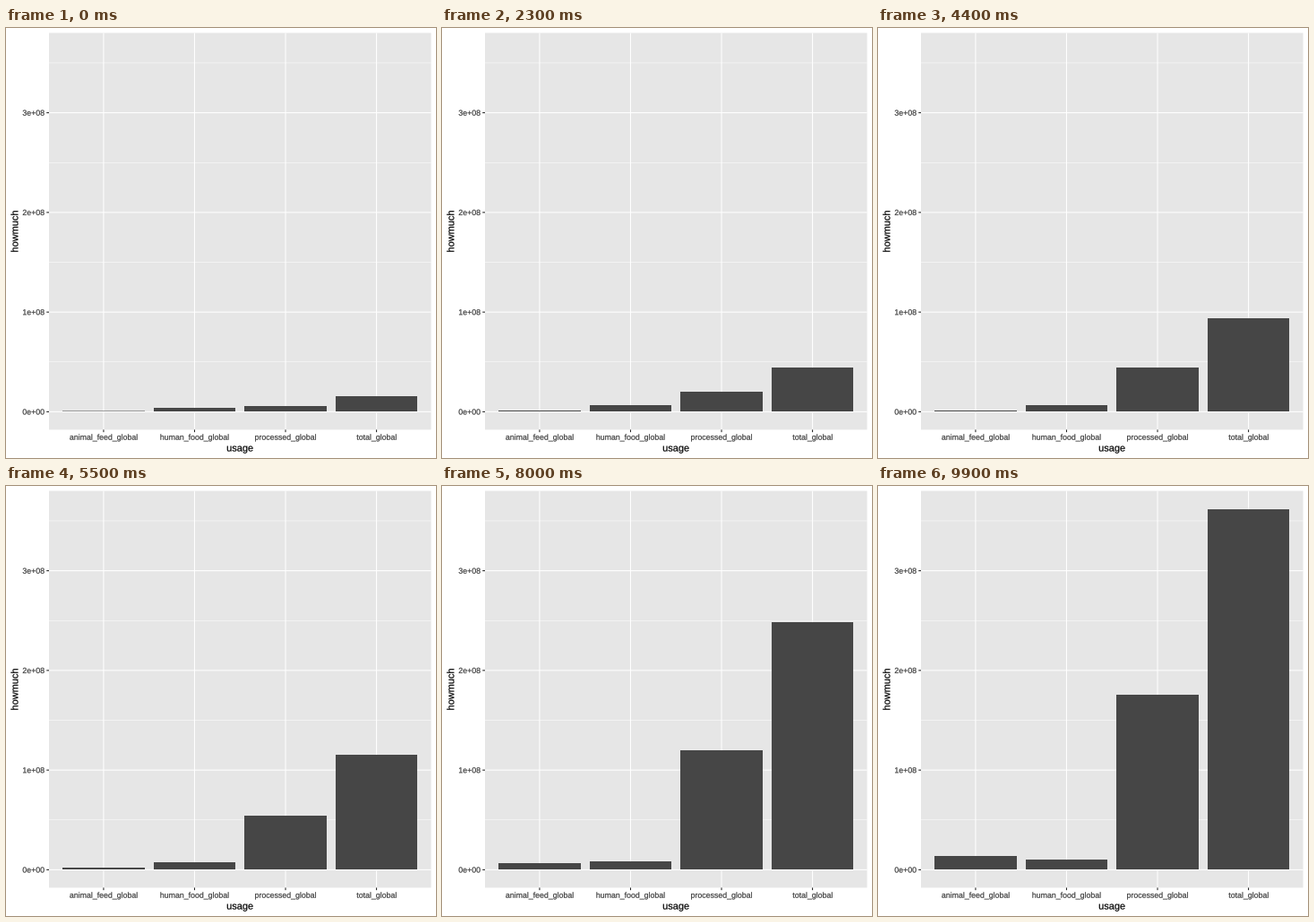
Animation of 480 by 480 pixels, one loop 10000 ms. Source, as a matplotlib script:

```python
import numpy as np
import matplotlib.pyplot as plt
from matplotlib.animation import FuncAnimation
from matplotlib.patches import PathPatch, Rectangle
from matplotlib.textpath import TextPath
from matplotlib.transforms import Affine2D

plt.rcParams["font.family"] = "Liberation Sans"

SIZE, FRAMES, INTERVAL = 480, 100, 100
LEFT, TOP, RIGHT, BOTTOM = 48.0, 5.5, 474.5, 448.4
ZERO, PER_MILLION = 428.4, 1.1127
STEP = (RIGHT - LEFT) / 4.2
PANEL, BAR, LABEL, TICK = "#e6e6e6", "#464646", "#3c3c3c", "#252525"
NAMES = ["animal_feed_global", "human_food_global",
         "processed_global", "total_global"]

# (frame, millions) turning points, linear in between
TOTAL = [(0, 15.4), (13, 26.8), (23, 44.4), (36, 88), (44, 93.9), (55, 115.4),
         (69, 155.8), (76, 207), (80, 248.5), (96, 360.5), (99, 361.8)]
HUMAN = [(0, 3.95), (23, 6.6), (50, 6.9), (69, 10.2), (80, 8.6), (99, 10.3)]

fig = plt.figure(figsize=(SIZE / 72, SIZE / 72), dpi=72, facecolor="white")
ax = fig.add_axes([0, 0, 1, 1])
ax.set_xlim(0, SIZE)
ax.set_ylim(SIZE, 0)
ax.axis("off")


def y_at(millions):
    return ZERO - millions * PER_MILLION


def x_at(slot):
    return LEFT + (slot + 0.6) * STEP


def amounts(frame):
    """Millions for each bar; feed and processing follow the total."""
    total = np.interp(frame, *zip(*TOTAL))
    human = np.interp(frame, *zip(*HUMAN))
    return 0.7 + total ** 2 / 10150, human, 0.49 * total - 2, total


def rect(x, y, w, h, color, z=0):
    return ax.add_patch(Rectangle((x, y), w, h, fc=color, lw=0,
                                  snap=False, zorder=z))


def line(x0, y0, x1, y1, color="white", width=1.07):
    ax.plot([x0, x1], [y0, y1], color=color, lw=width, snap=False,
            solid_capstyle="butt", zorder=1)


def label(x, y, text, size=8.8, color=LABEL, align=0.5, turn=0):
    """Outlined text on baseline y; align 0.5 centres, 1 ends at x."""
    path = TextPath((0, 0), text, size=size)
    box = path.get_extents()
    place = (Affine2D().translate(-box.x0 - align * box.width, 0)
             .scale(1, -1).rotate_deg(-turn).translate(x, y))
    ax.add_patch(PathPatch(place.transform_path(path), fc=color, ec=color,
                           lw=0.2, snap=False, zorder=3))


rect(LEFT, TOP, RIGHT - LEFT, BOTTOM - TOP, PANEL)

for millions in range(50, 400, 100):
    line(LEFT, y_at(millions), RIGHT, y_at(millions), width=0.53)

for n in range(4):
    y = y_at(100 * n)
    line(LEFT, y, RIGHT, y)
    line(LEFT - 2.75, y, LEFT, y, TICK)
    label(42.7, y + 3.1, f"{n}e+0{8 if n else 0}", align=1)

bars = []
for slot, name in enumerate(NAMES):
    x = x_at(slot)
    line(x, TOP, x, BOTTOM)
    line(x, BOTTOM, x, BOTTOM + 2.75, TICK)
    label(x, 459.7, name)
    x0, x1 = round(x - 0.45 * STEP), round(x + 0.45 * STEP)
    bars.append(rect(x0, round(ZERO), x1 - x0, 0, BAR, 2))

label((LEFT + RIGHT) / 2, 472.5, "usage", 11, "black")
label(13.4, (TOP + BOTTOM) / 2, "howmuch", 11, "black", turn=90)


def update(frame):
    base = round(ZERO)
    for bar, value in zip(bars, amounts(frame)):
        # whole pixels; a bar below one pixel stays as a faint line
        height = max(base - round(y_at(value)), 0.5)
        bar.set_y(base - height)
        bar.set_height(height)
    return bars


anim = FuncAnimation(fig, update, frames=FRAMES, interval=INTERVAL,
                     repeat=True, repeat_delay=0, blit=False)
plt.show()
```
